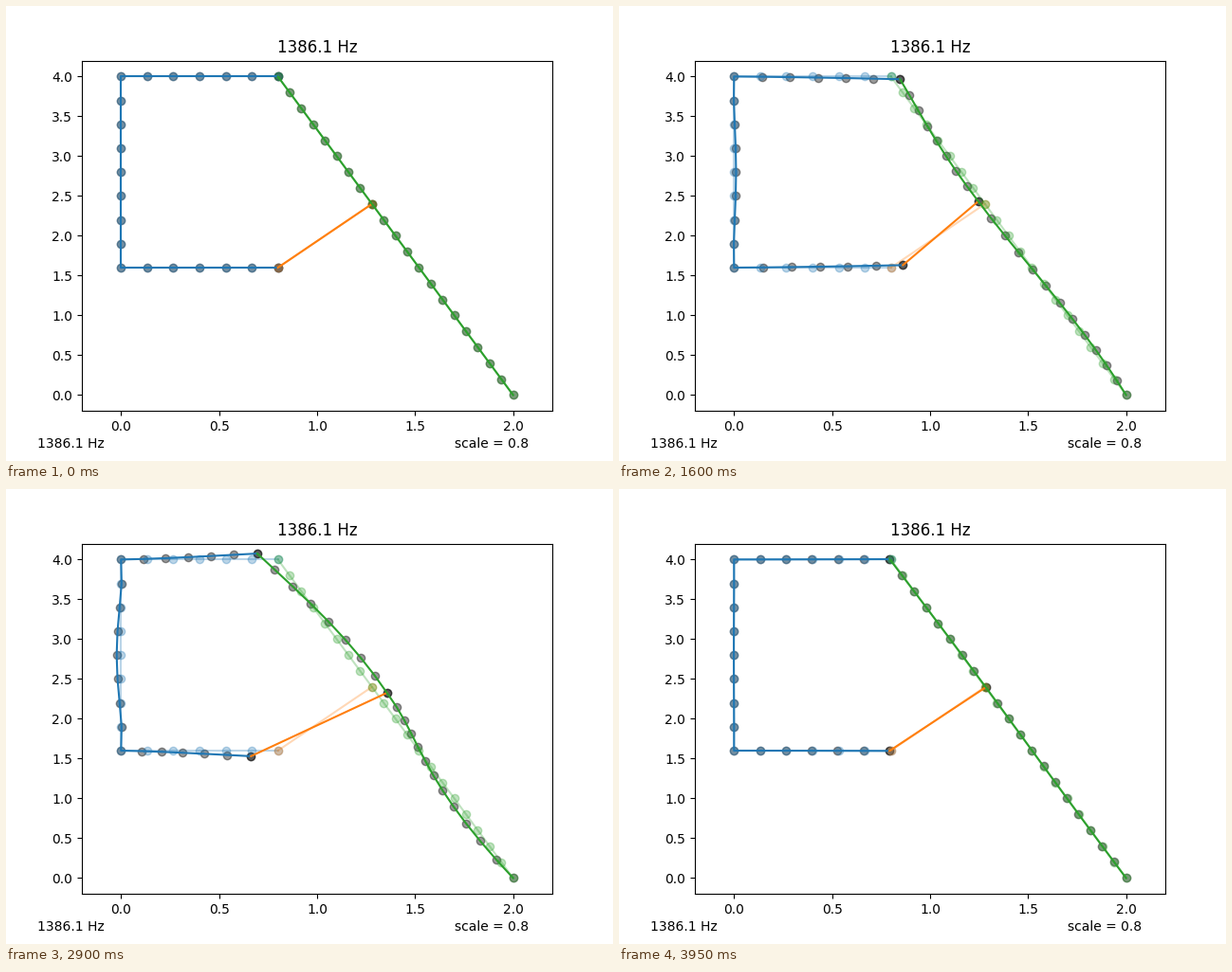
A matplotlib script that plays this animation: 640x480 px, repeating every 4 s.

```python
import numpy as np
import matplotlib.pyplot as plt
from matplotlib.animation import FuncAnimation

FRAMES, INTERVAL = 80, 50
FREQ = "1386.1 Hz"


def through(values, n):
    """Sample n points of the polynomial through evenly spaced values."""
    t = np.linspace(0, 1, len(values))
    return np.polyval(np.polyfit(t, values, len(values) - 1), np.linspace(0, 1, n))


def bend(s, slope):
    """Deflection of an arm whose root turns by the given slope."""
    return slope * s + 0.0475 * (1.5 * s**2 - 0.5 * s**3)


def wave(n):
    """Triangle wave: 0, 1, 0, -1 over one loop."""
    return abs((4 * n / FRAMES - 1) % 4 - 2) - 1


# Rest shape: bracket, link and arm
k = np.arange(7)
s = k / 6
q = np.arange(1, 8) / 8
bracket = np.column_stack([
    np.r_[0.8 * s[::-1], 0 * q, 0.8 * s],
    np.r_[4 + 0 * s, 4 - 2.4 * q, 1.6 + 0 * s],
])
arm = np.linspace((0.8, 4), (2, 0), 21)
link = np.array([bracket[-1], arm[8]])

# Mode shape: peak displacement of every node
p = 4 * q * (1 - q)
bracket_mode = np.column_stack([
    np.r_[0.137 * np.sin(0.17 * k)[::-1],
          -0.0313 * p + 0.0564 * p**2,
          0.160 * np.sin(0.21 * k)],
    np.r_[-bend(s, 0.036)[::-1], 0 * q, bend(s, 0.030)],
])
arm_mode = np.column_stack([
    np.r_[through([0.1166, 0.0503, -0.0198, -0.0692, -0.085], 9),
          through([-0.085, -0.0227, 0.0523, 0.0663, 0], 13)[1:]],
    np.r_[through([-0.0833, -0.0714, -0.0238, 0.0357, 0.082], 9),
          through([0.082, -0.0167, -0.1, -0.094, 0], 13)[1:]],
])
link_mode = np.array([bracket_mode[-1], arm_mode[8]])

members = [
    (bracket, bracket_mode, "C0"),
    (link, link_mode, "C1"),
    (arm, arm_mode, "C2"),
]

fig, ax = plt.subplots(figsize=(6.4, 4.8), dpi=100)
ax.set_xlim(-0.2, 2.2)
ax.set_ylim(-0.2, 4.2)
ax.set_title(FREQ)
fig.text(33 / 640, 0.03, FREQ)
fig.text(0.8, 0.03, "scale = 0.8", ha="center")

lines, nodes = [], []
for rest, _, color in members:
    ax.plot(*rest.T, "o-", color=color, alpha=0.3)
for rest, _, color in members:
    nodes.append(ax.scatter(*rest.T, color="k", alpha=0.4, linewidths=1))
    lines.append(ax.plot(*rest.T, color=color)[0])


def update(n):
    a = wave(n)
    for (rest, mode, _), line, dots in zip(members, lines, nodes):
        pos = rest + a * mode
        line.set_data(*pos.T)
        dots.set_offsets(pos)
    return lines + nodes


anim = FuncAnimation(fig, update, frames=FRAMES, interval=INTERVAL,
                     repeat=True, repeat_delay=0)
plt.show()
```
